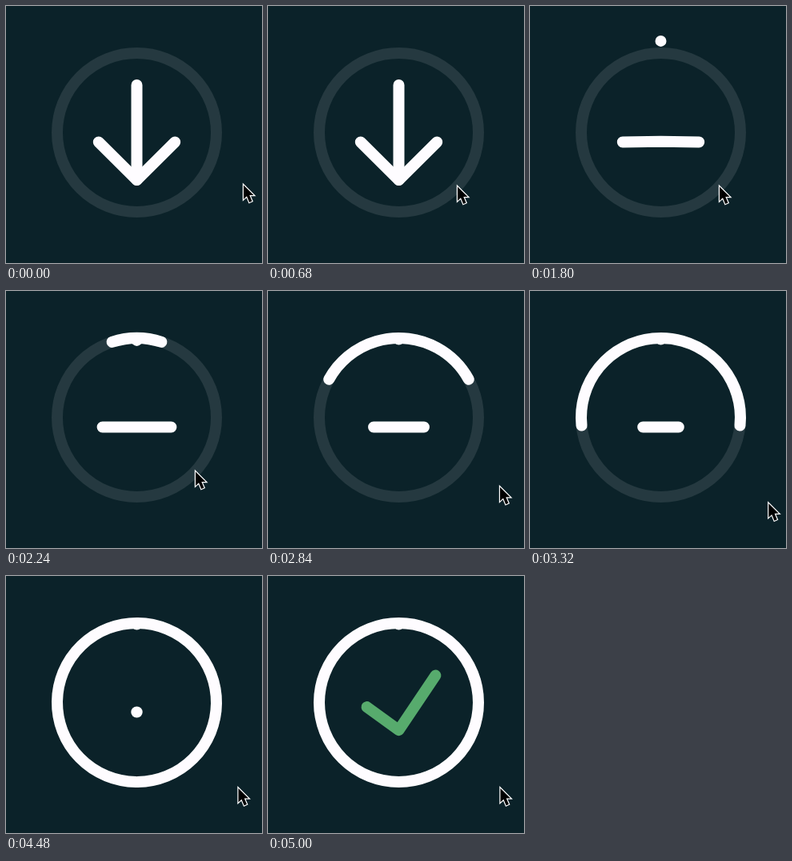
Animation of 320x322 px, one loop 5040 ms. Source, as an HTML page with a canvas:

```html
<!DOCTYPE html>
<html lang="en">
<head>
<meta charset="utf-8">
<title>Download button</title>
<style>
  html, body { margin: 0; width: 100%; height: 100%; overflow: hidden; background: #0b2229; }
  canvas { display: block; }
</style>
</head>
<body>
<canvas width="320" height="322"></canvas>
<script>
const ctx = document.querySelector('canvas').getContext('2d');
const LOOP = 5040, STEP = 40;
const CX = 163.5, CY = 158.5, R = 99.5, BAR_Y = 170.5, HALF = 47.7;
const WHITE = [254, 252, 255], GREEN = [87, 171, 109];
const POINTER = [[0, 0], [0, 17.5], [4, 13.8], [7.2, 21.5], [10.5, 20], [7.3, 12.6], [12.6, 12.6]];

const mix = (a, b, p) => a + (b - a) * p;
const span = (t, from, to) => Math.min(1, Math.max(0, (t - from) / (to - from)));
const smooth = p => p * p * (3 - 2 * p);
const fade = x => Math.exp(-0.55 * x);
const rgb = c => `rgb(${c.map(Math.round)})`;

// Point on a Bezier curve of any degree
function bezier(points, u) {
  while (points.length > 1) {
    points = points.slice(1).map((b, i) => b.map((v, k) => mix(points[i][k], v, u)));
  }
  return points[0];
}

function line(points, color = rgb(WHITE)) {
  ctx.beginPath();
  points.forEach(p => ctx.lineTo(...p));
  ctx.strokeStyle = color;
  ctx.stroke();
}

function arc(half, color) {
  ctx.beginPath();
  ctx.arc(CX, CY, R, -Math.PI / 2 - half, -Math.PI / 2 + half);
  ctx.strokeStyle = color;
  ctx.stroke();
}

function drawShaft(t) {
  if (t < 1432) {
    const p = smooth(span(t, 980, 1432));
    line([[CX, mix(99, CY, p)], [CX, mix(218, CY, p)]]);
    return;
  }
  // The dot springs up to the ring
  const x = (t - 1432) * 0.00875;
  const y = 60.5 + 98 * fade(x) * Math.cos(x);
  ctx.beginPath();
  ctx.arc(CX, y, 7, 0, 2 * Math.PI);
  ctx.fillStyle = rgb(WHITE);
  ctx.fill();
}

function drawBar(t, progress) {
  const x = Math.max(0, t - 1480) * 0.0125;
  const sag = 47.5 * (1 - smooth(span(t, 980, 1440))) + 7.5 * fade(x) * Math.sin(x);
  const half = HALF * (1 - progress);
  line([[CX - half, BAR_Y], [CX, BAR_Y + sag], [CX + half, BAR_Y]]);
}

function drawCheck(t) {
  const x = (t - 4490) * 0.014;
  const size = 1 - fade(x) * Math.cos(x);
  const tint = smooth(span(t, 4490, 4980));
  line([[-40.5, -6.5], [0, 23], [46.5, -46.5]].map(([dx, dy]) => [CX + dx * size, BAR_Y + dy * size]),
    rgb(WHITE.map((v, i) => mix(v, GREEN[i], tint))));
}

function drawPointer(t) {
  const [x, y] = t < 2640
    ? bezier([[297, 224.5], [258, 249], [237, 226.5]], smooth(span(t, 0, 680)))
    : bezier([[237, 226.5], [320, 249], [315, 269], [290.5, 266]], 1 - (1 - span(t, 2640, 3500)) ** 1.36);
  ctx.save();
  ctx.translate(x, y);
  ctx.beginPath();
  POINTER.forEach(p => ctx.lineTo(...p));
  ctx.closePath();
  ctx.lineWidth = 2.4;
  ctx.lineJoin = 'miter';
  ctx.miterLimit = 3;
  ctx.strokeStyle = '#fff';
  ctx.stroke();
  ctx.fillStyle = '#000';
  ctx.fill();
  ctx.restore();
}

function draw(t) {
  const progress = span(t, 1988, 4490);
  ctx.fillStyle = '#0b2229';
  ctx.fillRect(0, 0, 320, 322);
  ctx.lineWidth = 14;
  ctx.lineCap = ctx.lineJoin = 'round';
  arc(Math.PI, 'rgba(255,255,255,.105)');
  if (progress > 0) arc(Math.PI * progress, rgb(WHITE));
  drawShaft(t);
  if (progress < 1) drawBar(t, progress);
  else drawCheck(t);
  drawPointer(t);
}

const start = performance.now();
function tick() {
  const t = (performance.now() - start) % LOOP;
  draw(Math.floor(t / STEP) * STEP);
  requestAnimationFrame(tick);
}
tick();
</script>
</body>
</html>
```
